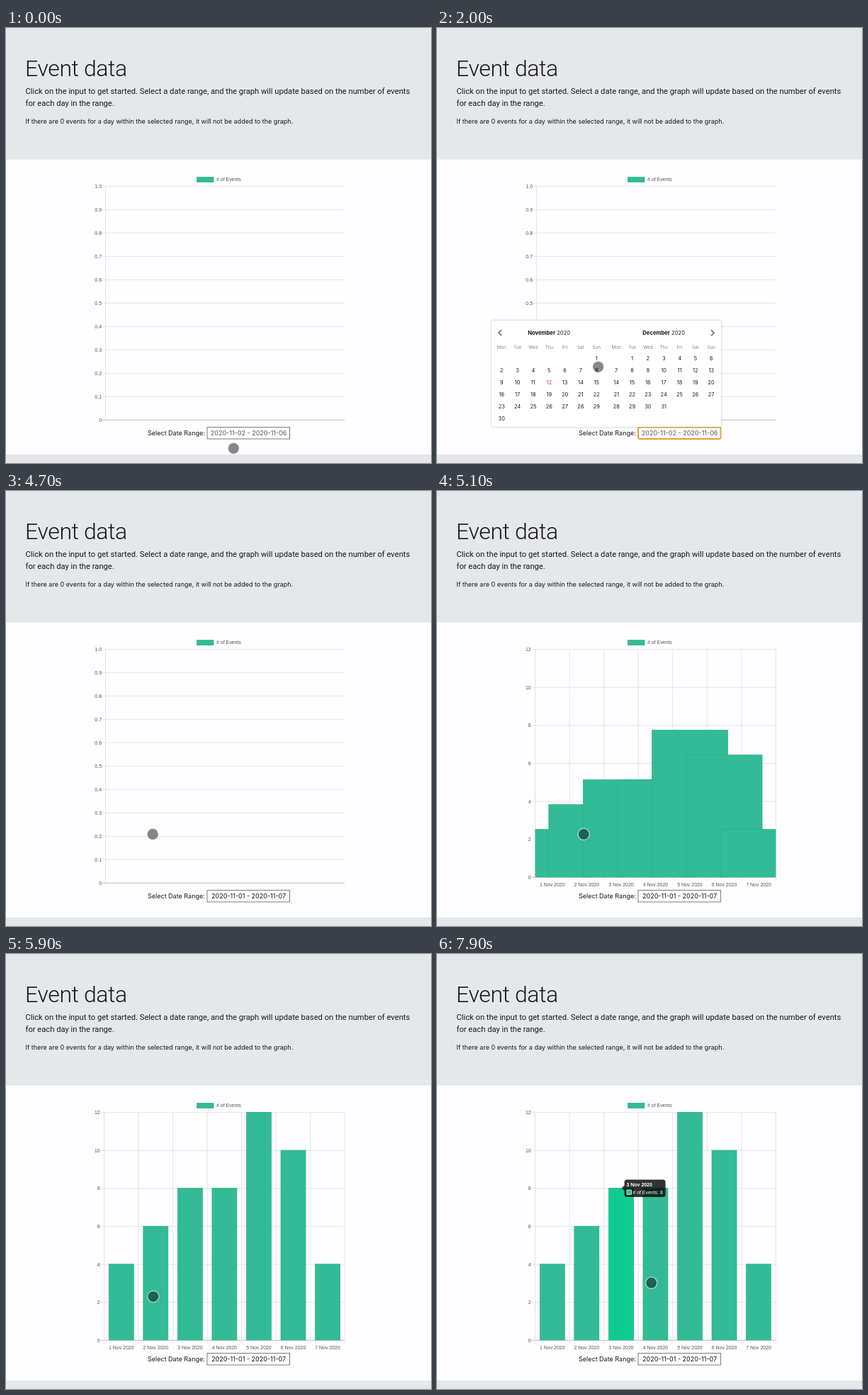
These frames come from a looping animation (600x614 px, 8000 ms). An HTML page:

```html
<!DOCTYPE html>
<html lang="en">
<head>
<meta charset="utf-8">
<title>Event data</title>
<style>
html, body { margin: 0; width: 100%; height: 100%; overflow: hidden; background: #fefdff; }
svg { display: block; width: 600px; height: 614px; }
text { white-space: pre; fill: #17181b; font-family: Inter, "Open Sans", sans-serif; }
.title { font: 350 32px Roboto, sans-serif; letter-spacing: -.012em; }
.lead { font: 400 11.2px Roboto, sans-serif; }
.body { font-size: 9.03px; }
.tick { font: 6.95px "Liberation Sans", Arial, sans-serif; fill: #555; }
.tip { font: 6.95px "Liberation Sans", Arial, sans-serif; fill: #fff; }
.month { font-size: 7.65px; }
.week { font-size: 6.3px; fill: #85858a; }
.day { font-size: 7.4px; }
.bold { font-weight: 700; }
.mid { text-anchor: middle; }
.end { text-anchor: end; }
.grid { stroke: #e4e4e8; stroke-width: 1; }
.axis { stroke: #bcbcc0; stroke-width: 1; }
.bar { fill: #32bb96; stroke: #2aae88; stroke-width: .7; }
.hot { fill: #10cc92; }
</style>
</head>
<body>
<svg id="stage" viewBox="0 0 600 614">
  <defs>
    <clipPath id="plot"><rect x="138.5" y="223" width="340" height="322.3"/></clipPath>
    <filter id="soft" x="-5%" y="-5%" width="110%" height="110%">
      <feDropShadow dx="0" dy="0" stdDeviation="1.6" flood-color="#888" flood-opacity=".6"/>
    </filter>
  </defs>
  <rect width="600" height="614" fill="#fefdff"/>
  <rect width="600" height="185.5" fill="#e6e7eb"/>
  <rect y="602" width="600" height="12" fill="#e6e7eb"/>
  <text class="title" x="27" y="68">Event data</text>
  <text class="lead" x="27.5" y="93">Click on the input to get started. Select a date range, and the graph will update based on the number of events</text>
  <text class="lead" x="27.5" y="110.3">for each day in the range.</text>
  <text class="body" x="27.5" y="135.3">If there are 0 events for a day within the selected range, it will not be added to the graph.</text>

  <rect class="bar" x="269.5" y="210.5" width="23.5" height="7"/>
  <text class="tick" x="297" y="216.3"># of Events</text>
  <g id="empty"></g>
  <g id="chart">
    <g id="grid"></g>
    <g id="bars" clip-path="url(#plot)"></g>
    <g id="tip">
      <path d="M0 0L4 -4V-8.5Q4 -12 7.5 -12H58.5Q62 -12 62 -8.5V9Q62 12.5 58.5 12.5H7.5Q4 12.5 4 9V4Z" fill="#000" fill-opacity=".8"/>
      <text class="tip bold" id="tipDay" x="7" y="-2.6"></text>
      <rect x="7.4" y="2.4" width="6.6" height="6.6" fill="#32bb96" stroke="#fff" stroke-width=".7"/>
      <text class="tip" id="tipSum" x="15.8" y="8.2"></text>
    </g>
  </g>

  <text class="body" x="200" y="575.4">Select Date Range:</text>
  <rect id="field" x="284" y="563.5" width="116.5" height="16.5" fill="#fff"/>
  <text class="body mid" id="range" x="342.6" y="575.4"></text>

  <g id="picker">
    <rect x="77" y="413" width="324" height="150" rx="3" fill="#fff" filter="url(#soft)"/>
    <path d="M91 426.2L87 430.2L91 434.2M387 426.2L391 430.2L387 434.2" fill="none" stroke="#85858a" stroke-width="2"/>
    <g id="days"></g>
    <g id="picked">
      <path d="M236.3 458V475H217Q214 475 214 472V461Q214 458 217 458Z" fill="#1f88ee"/>
      <text class="day bold mid" x="225.2" y="469.2" style="fill:#fff">1</text>
    </g>
  </g>
  <circle id="touch" r="8.1" fill="#000" fill-opacity=".47" stroke="#fff" stroke-opacity=".6" stroke-width="1.4"/>
</svg>
<script>
(() => {
const LOOP = 8000, OPEN = 1200, PICK = 2600, CLOSE = 4000;
const DRAW = 4868, TIP = 6150, SWITCH = 7260;
const counts = [4, 6, 8, 8, 12, 10, 4];
const BASE = 545, UNIT = 26.8, LEFT = 138.5, STEP = 48.55;

const $ = id => document.getElementById(id);
const set = (el, attrs) => { for (const k in attrs) el.setAttribute(k, attrs[k]); };
const show = (id, on) => { $(id).style.display = on ? "" : "none"; };
const clamp = v => Math.min(1, Math.max(0, v));
const mix = (a, b, k) => a + (b - a) * k;
const outQuart = v => 1 - Math.pow(1 - clamp(v), 4);

function add(parent, tag, attrs, text) {
  const el = document.createElementNS("http://www.w3.org/2000/svg", tag);
  set(el, attrs);
  if (text !== undefined) el.textContent = text;
  $(parent).append(el);
  return el;
}
const label = (parent, cls, x, y, text) => add(parent, "text", { class: cls, x, y }, text);
const line = (parent, cls, x1, y1, x2, y2) => add(parent, "line", { class: cls, x1, y1, x2, y2 });
const barMid = i => LEFT + STEP * (i + .5);
const barTop = i => BASE - counts[i] * UNIT;
const dayName = i => `${i + 1} Nov 2020`;

// Chart without data
for (let i = 0; i <= 10; i++) {
  const y = 553.3 - i * 33;
  line("empty", i ? "grid" : "axis", 135.5, y, 478, y);
  label("empty", "tick end", 135, y + 2.4, i ? (i / 10).toFixed(1) : "0");
}
line("empty", "grid", 140.5, 223, 140.5, 553);

// Chart with data
for (let v = 0; v <= 12; v += 2) {
  const y = BASE + .3 - v * UNIT;
  line("grid", v ? "grid" : "axis", 133.5, y, 478.4, y);
  label("grid", "tick end", 132.7, y + 2.4, v);
}
for (let i = 0; i <= 7; i++) line("grid", "grid", LEFT + i * STEP, 223, LEFT + i * STEP, 550);
const bars = counts.map((n, i) => {
  label("grid", "tick mid", barMid(i), 557.6, dayName(i));
  return add("bars", "rect", { class: "bar" });
});
const hot = [1, 2].map(i => add("bars", "rect", {
  class: "hot", x: barMid(i) - 17.5, y: barTop(i), width: 35, height: BASE - barTop(i)
}));

// Two calendar months
function month(name, x, first, length, today) {
  const title = label("days", "month mid", x + 67, 432.6, "");
  title.innerHTML = `<tspan class="bold">${name}</tspan> 2020`;
  "Mon Tue Wed Thu Fri Sat Sun".split(" ").forEach((d, i) =>
    label("days", "week mid", x + i * 22.33, 452.8, d));
  for (let d = 1; d <= length; d++) {
    const cell = first + d - 1;
    const el = label("days", "day mid", x + cell % 7 * 22.33, 469.2 + Math.floor(cell / 7) * 17.05, d);
    if (d === today) el.style.fill = "#dd3b26";
  }
}
month("November", 91.2, 6, 30, 12);
month("December", 253.2, 1, 31);

// Touch point: time, x, y
const path = [
  [0, 321.3, 593.3], [200, 321.3, 573], [1330, 321.3, 573], [2000, 227.6, 478.3],
  [2200, 226, 470], [2800, 226, 470], [3380, 158.4, 485], [3450, 158.4, 485],
  [3800, 207.6, 485], [4350, 207.6, 485], [4400, 208.4, 484.6], [4650, 208.4, 484.6],
  [4700, 207.2, 484.4], [5750, 207.2, 484.4], [5850, 207.9, 483.6], [6650, 207.9, 483.6],
  [7080, 265, 476.8], [7220, 261.5, 479], [7520, 261.5, 479], [7900, 302.7, 464.2]
];
function touchAt(t) {
  const n = path.findIndex(p => p[0] > t);
  if (n < 0) return path[path.length - 1].slice(1);
  const a = path[n - 1], b = path[n], k = (t - a[0]) / (b[0] - a[0]);
  const s = k * k * (3 - 2 * k);
  return [mix(a[1], b[1], s), mix(a[2], b[2], s)];
}

function render(t) {
  const drawn = t >= DRAW, focus = t >= OPEN && t < PICK, done = t >= CLOSE;
  show("empty", !drawn);
  show("chart", drawn);
  show("picker", t >= OPEN && !done);
  show("picked", t >= PICK);

  set($("field"), focus
    ? { stroke: "#dfa03c", "stroke-width": 1.9, rx: 1.5 }
    : { stroke: "#7c7c7c", "stroke-width": 1, rx: 0 });
  $("range").textContent = done ? "2020-11-01 - 2020-11-07" : "2020-11-02 - 2020-11-06";
  $("range").style.fill = done ? "#111" : "#57575a";

  // Bars grow from the old baseline while their width narrows
  const grow = outQuart((t - DRAW) / 1000);
  const w = mix(243, 35, grow);
  bars.forEach((bar, i) => {
    const y = mix(553, barTop(i), grow);
    set(bar, { x: barMid(i) - w / 2, y, width: w, height: 560 - y });
  });

  const fade = outQuart((t - TIP) / 400), swap = outQuart((t - SWITCH) / 400);
  hot[0].style.opacity = fade * (1 - swap);
  hot[1].style.opacity = swap;
  const day = t < SWITCH ? 1 : 2;
  $("tipDay").textContent = dayName(day);
  $("tipSum").textContent = `# of Events: ${counts[day]}`;
  $("tip").style.opacity = fade;
  const x = mix(barMid(1), barMid(2), swap) + .7, y = mix(barTop(1), barTop(2), swap);
  set($("tip"), { transform: `translate(${x} ${y})` });

  set($("touch"), { transform: `translate(${touchAt(t)})` });
}

const start = performance.now();
function frame() {
  render((performance.now() - start) % LOOP);
  requestAnimationFrame(frame);
}
frame();
})();
</script>
</body>
</html>
```
